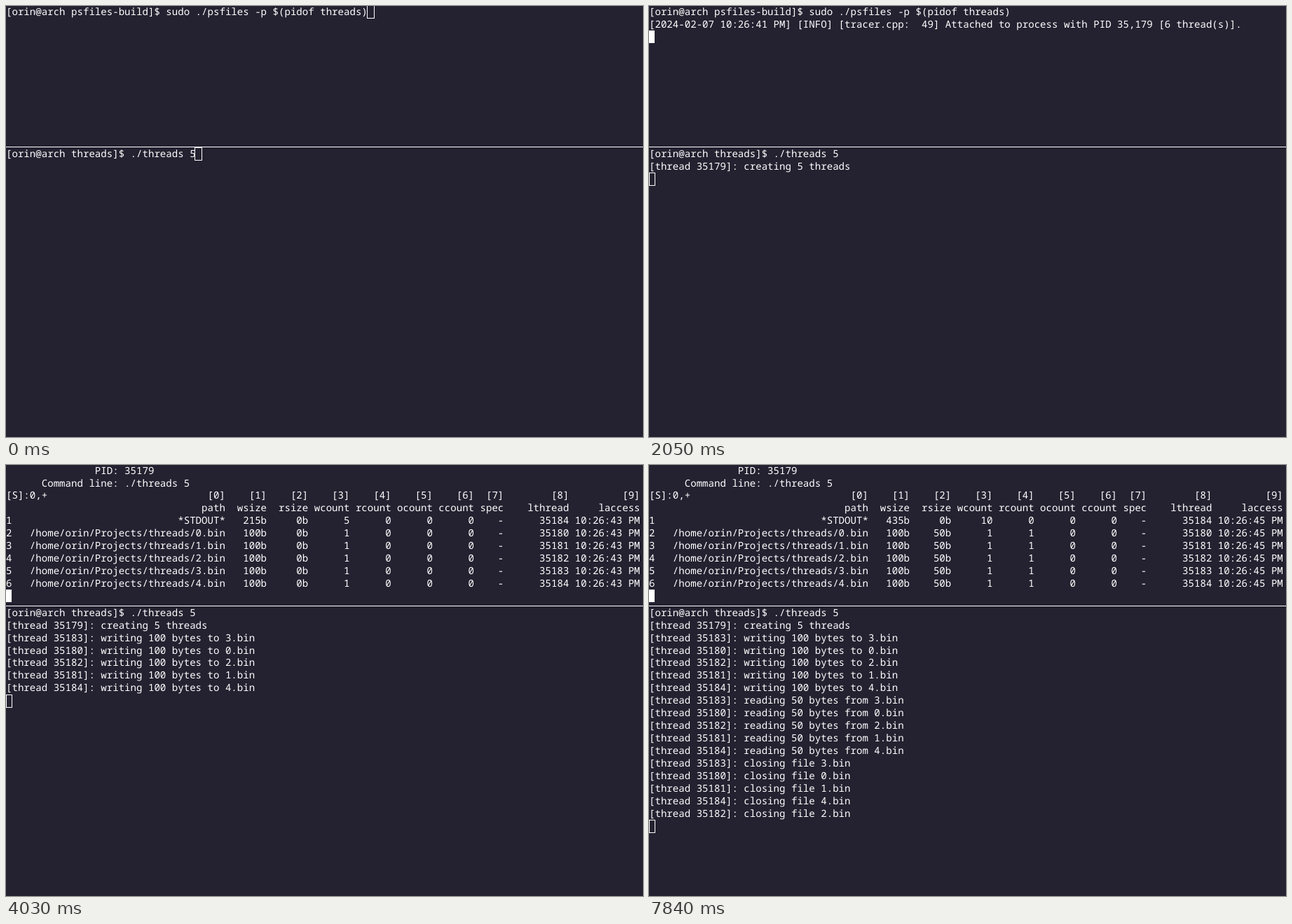
An HTML page with a canvas that plays this animation: 909 by 616 pixels, repeating every 8 s.

```html
<!DOCTYPE html>
<html lang="en">
<head>
<meta charset="utf-8">
<title>Split terminal</title>
<style>
  html, body { margin: 0; width: 100%; height: 100%; overflow: hidden; background: #242130; }
  canvas { display: block; }
</style>
</head>
<body>
<canvas id="stage" width="909" height="616"></canvas>
<script>
const LOOP = 8000;
const CELL_W = 8.46, CELL_H = 17.92;
const TOP_Y = -0.4, BOTTOM_Y = 202.8;
const BACKGROUND = "#242130", INK = "#ffffff";
const ctx = document.getElementById("stage").getContext("2d");

const USER = "orin";
const PSFILES = `[${USER}@arch psfiles-build]$ sudo ./psfiles -p $(pidof threads)`;
const THREADS = `[${USER}@arch threads]$ ./threads 5`;
const ATTACHED = "[2024-02-07 10:26:41 PM] [INFO] [tracer.cpp:  49] " +
  "Attached to process with PID 35,179 [6 thread(s)].";
const SUMMARY = [" ".repeat(15) + "PID: 35179", " ".repeat(6) + "Command line: ./threads 5"];

const COLUMNS = ["path", "wsize", "rsize", "wcount", "rcount", "ocount", "ccount", "spec", "lthread", "laccess"];
const WIDTHS = [37, 7, 7, 7, 7, 7, 7, 5, 11, 12];

// Right-aligned columns, with a label overlaid at the left edge.
function tableRow(label, cells) {
  const row = cells.map((cell, i) => String(cell).padStart(WIDTHS[i])).join("");
  return label + row.slice(label.length);
}

function table(stdoutSize, stdoutWrites, readSize, reads, time) {
  const access = [`${time} PM`];
  const files = [0, 1, 2, 3, 4].map(n => tableRow(String(n + 2),
    [`/home/${USER}/Projects/threads/${n}.bin`, "100b", readSize, 1, reads, 0, 0, "-", 35180 + n, access]));
  return [
    ...SUMMARY,
    tableRow("[S]:0,+", COLUMNS.map((_, i) => `[${i}]`)),
    tableRow("", COLUMNS),
    tableRow("1", ["*STDOUT*", stdoutSize, "0b", stdoutWrites, 0, 0, 0, "-", 35184, access]),
    ...files
  ];
}

const threadLog = (order, action) =>
  order.map(n => `[thread ${35180 + n}]: ${action} ${n}.bin`);

const created = [THREADS, "[thread 35179]: creating 5 threads"];
const written = [...created, ...threadLog([3, 0, 2, 1, 4], "writing 100 bytes to")];
const wereRead = [...written, ...threadLog([3, 0, 2, 1, 4], "reading 50 bytes from")];
const closed = [...wereRead, ...threadLog([3, 0, 1, 4, 2], "closing file")];

// Each entry: start time, lines, cursor style, whether the cursor stays on the last line.
const topStates = [
  [0, [PSFILES], "hollow", true],
  [1790, [PSFILES], "solid", true],
  [2050, [PSFILES, ATTACHED], "solid"],
  [3040, SUMMARY, "solid"],
  [4030, table("215b", 5, "0b", 0, "10:26:43"), "solid"],
  [6020, table("435b", 10, "50b", 1, "10:26:45"), "solid"]
];
const bottomStates = [
  [0, [THREADS], "hollow", true],
  [80, [THREADS], "solid", true],
  [660, [THREADS], "none", true],
  [900, created, "solid"],
  [1480, created, "none"],
  [1720, created, "hollow"],
  [3870, written, "hollow"],
  [5930, wereRead, "hollow"],
  [7840, closed, "hollow"]
];

function drawCursor(style, col, top) {
  const x = col * CELL_W, y = Math.floor(top);
  if (style === "solid") {
    ctx.fillRect(Math.round(x), y, 8, 18);
  } else if (style === "hollow") {
    const left = Math.max(0, Math.floor(x - 1));
    const right = Math.round(x + CELL_W);
    ctx.strokeRect(left + 0.5, y + 0.5, right - left, 18);
  }
}

function drawPane(states, originY, time) {
  const [, lines, cursor, onLastLine] = states.findLast(state => state[0] <= time);
  lines.forEach((line, row) => ctx.fillText(line, 0, Math.round(originY + row * CELL_H + 13)));
  const row = onLastLine ? lines.length - 1 : lines.length;
  const col = onLastLine ? lines[row].length : 0;
  drawCursor(cursor, col, originY + row * CELL_H);
}

function draw(now) {
  const time = now % LOOP;
  ctx.fillStyle = BACKGROUND;
  ctx.fillRect(0, 0, 909, 616);
  ctx.fillStyle = ctx.strokeStyle = INK;
  ctx.lineWidth = 1;
  ctx.font = '14.1px "Noto Sans Mono", monospace';
  ctx.textRendering = "geometricPrecision";
  ctx.fillRect(0, 201, 909, 1);
  drawPane(topStates, TOP_Y, time);
  drawPane(bottomStates, BOTTOM_Y, time);
}

const start = performance.now();
function tick() {
  draw(performance.now() - start);
  requestAnimationFrame(tick);
}
tick();
</script>
</body>
</html>
```
